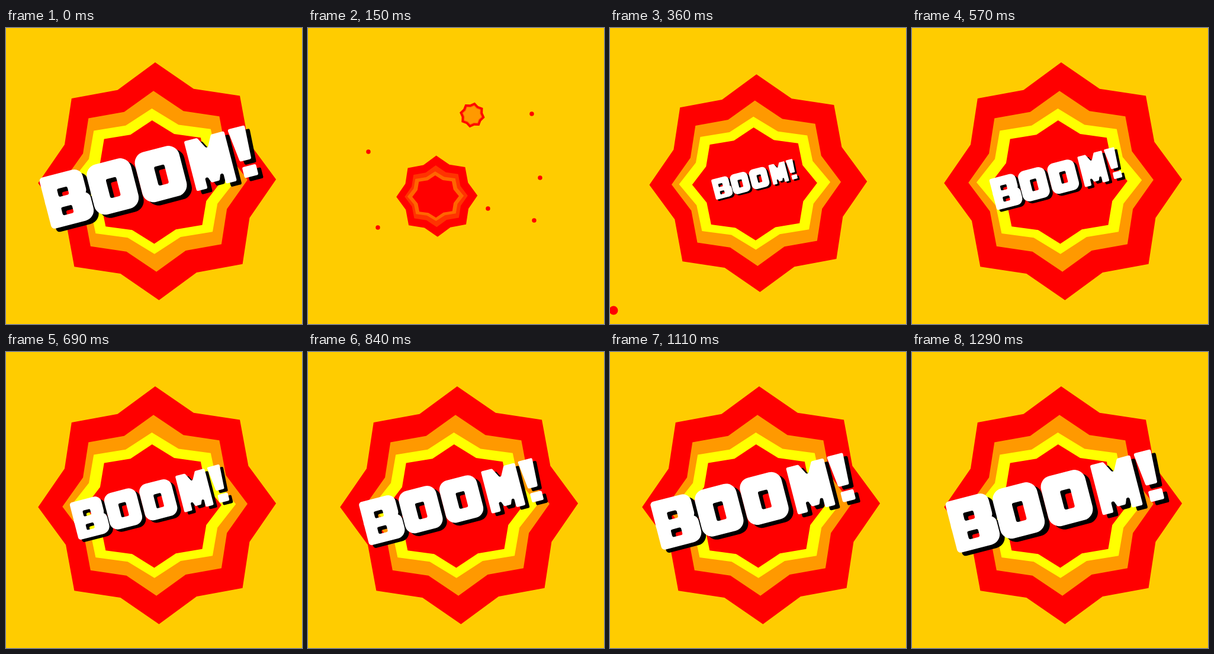
These frames come from a looping animation (500x500 px, 1.32 s). An HTML page with a canvas:

```html
<!DOCTYPE html>
<html lang="en">
<head>
<meta charset="utf-8">
<title>Boom</title>
<style>
html, body { margin: 0; width: 100%; height: 100%; overflow: hidden; background: #fc0; }
canvas { display: block; width: 500px; height: 500px; }
</style>
</head>
<body>
<canvas id="stage" width="500" height="500" role="img" aria-label="BOOM!"></canvas>
<script>
const ctx = document.getElementById('stage').getContext('2d');
const STEP = 30, STEPS = 44;
const TIP = 201, NOTCH = 168, TILT = -0.016;

// Lettering, in units of the full-size word before it is tilted
function roundedPolygon(radius, points) {
  const path = new Path2D();
  const [first, last] = [points[0], points[points.length - 1]];
  path.moveTo((first[0] + last[0]) / 2, (first[1] + last[1]) / 2);
  points.forEach((p, i) => path.arcTo(...p, ...points[(i + 1) % points.length], radius));
  path.closePath();
  return path;
}

function block(x, y, w, h, radii, hole) {
  const path = new Path2D();
  path.roundRect(x, y, w, h, radii);
  if (hole) path.roundRect(...hole, 3);
  return path;
}

const letterO = x => block(x, 1, 77, 87, 19, [x + 30, 30, 18, 33]);

function letterM(center) {
  const half = [[12, 1], [35, 1], [35, 88], [16, 88], [16, 56], [7, 80]];
  const left = half.map(([x, y]) => [center - x, y]);
  const right = half.map(([x, y]) => [center + x, y]).reverse();
  return roundedPolygon(3, [[center, 24], ...left, ...right]);
}

const WORD = [
  block(0, 0, 73, 48, [6, 15, 12, 0], [25, 25, 18, 14]),
  block(0, 41, 77, 48, [0, 12, 18, 6], [24, 57, 19, 14]),
  letterO(79),
  letterO(163),
  letterM(288),
  roundedPolygon(3, [[329, 0], [359, 0], [356, 58], [336, 58]]),
  block(337, 68, 24, 19, 3)
];

function drawStar(x, y, sx, sy, color, angle = 0) {
  ctx.beginPath();
  for (let i = 0; i < 16; i++) {
    const r = i % 2 ? NOTCH : TIP, a = i * Math.PI / 8 + TILT + angle;
    ctx.lineTo(x + r * sx * Math.sin(a), y - r * sy * Math.cos(a));
  }
  ctx.fillStyle = color;
  ctx.fill();
}

// Red to yellow, in steps of the web-safe palette
const warm = green => `rgb(255, ${Math.round(green / 51) * 51}, 0)`;

function drawBurst(step) {
  const s = Math.min(1, 0.341 + 0.082 * (step - 5));
  const x = 198.4 + 56.8 * s, y = 297.2 - 38.3 * s;
  drawStar(x, y, s, s, '#f00');
  drawStar(x - 3.6 * s, y, 0.778 * s, 0.76 * s, warm(153 * s));
  drawStar(x - 6.6 * s, y, 0.695 * s, 0.611 * s, warm(255 * s));
  drawStar(x - 6.6 * s, y + 1.3 * s, 0.574 * s, 0.519 * s, '#f00');
}

// Dots fly straight out from one point, growing as they come closer
const DOT_ORIGIN = [182, 257];
const DOT_SPEEDS = [[-20, -12], [-16, 20], [30.5, 12], [50, 17], [52.5, -1], [49, -28]];

function drawDots(age) {
  ctx.fillStyle = '#f00';
  for (const [vx, vy] of DOT_SPEEDS) {
    ctx.beginPath();
    ctx.arc(DOT_ORIGIN[0] + vx * age, DOT_ORIGIN[1] + vy * age, 1.6 + 0.53 * age, 0, 2 * Math.PI);
    ctx.fill();
  }
}

function drawChunk(age) {
  const s = 0.027 * age, angle = 0.054 * age;
  const x = 198.2 + 19.8 * age, y = 297 - 37.5 * age;
  drawStar(x, y, s, s, '#f00', angle);
  drawStar(x, y, s * 0.79, s * 0.79, '#f60', angle);
  drawStar(x, y, s * 0.72, s * 0.72, '#f90', angle);
}

function drawWord(step) {
  // Fast growth, then a slow push
  const s = Math.min(0.395 + 0.0304 * (step - 12), 1 + 0.0104 * (step - 43));
  const x = 242.3 + 3.5 * (1 - s), y = 252 + 6 * (1 - s);
  for (const [color, dx, dy] of [['#000', 8.5, 5.5], ['#fff', 0, 0]]) {
    ctx.save();
    ctx.translate(x, y);
    ctx.scale(s, s);
    ctx.translate(dx - 187, dy + 2);
    ctx.rotate(-14.5 * Math.PI / 180);
    ctx.fillStyle = color;
    for (const path of WORD) ctx.fill(path, 'evenodd');
    ctx.restore();
  }
}

function draw(step) {
  ctx.fillStyle = '#fc0';
  ctx.fillRect(0, 0, 500, 500);
  if (step > 1 && step < 19) drawDots(step - 1);
  drawBurst(step);
  if (step > 1 && step < 12) drawChunk(step - 1);
  if (step >= 6) drawWord(step);
}

let start;
function tick(now) {
  start ??= now;
  const step = Math.floor(Math.max(0, now - start) / STEP) % STEPS;
  draw(step || STEPS - 1); // the loop opens on its closing pose
  requestAnimationFrame(tick);
}
draw(STEPS - 1);
requestAnimationFrame(tick);
</script>
</body>
</html>
```
